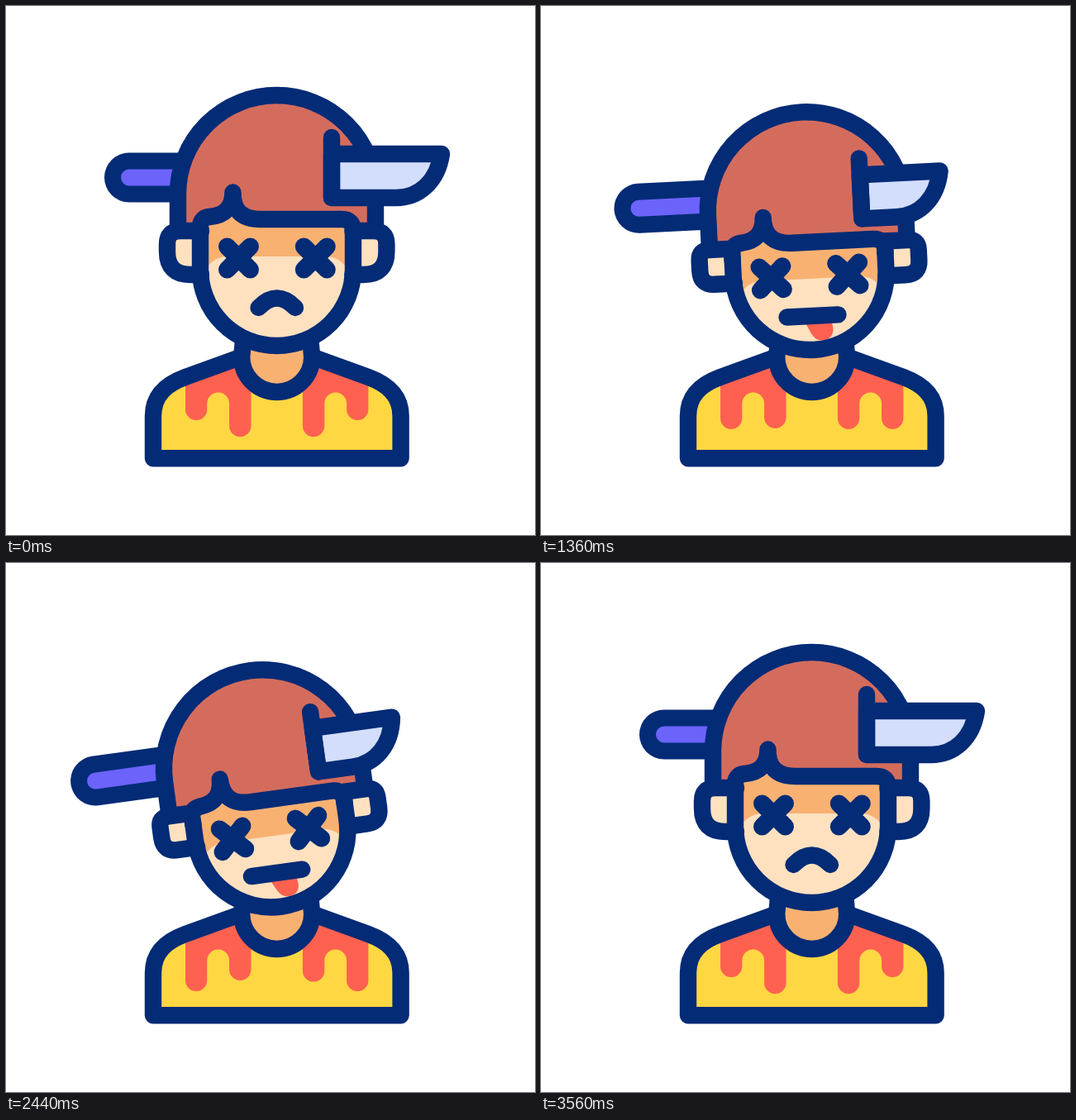
Write an HTML page with a canvas that moves like this. It is 640x640 px and loops after 3.6 s.

```html
<!DOCTYPE html>
<html lang="en">
<head>
<meta charset="utf-8">
<title>Knife through the head</title>
<style>
  html, body { margin: 0; width: 100%; height: 100%; overflow: hidden; background: #fff; }
  canvas { display: block; width: 640px; height: 640px; }
</style>
</head>
<body>
<canvas id="stage" width="640" height="640"></canvas>
<script>
const LOOP = 3600;
const NAVY = '#032b76', HAIR = '#d46c5d', SHADE = '#f9b172', SKIN = '#ffe1c0';
const RED = '#ff6150', YELLOW = '#ffd743', STEEL = '#d3defc', GRIP = '#6c63fa';
const LINE = 20.4;

const ctx = document.getElementById('stage').getContext('2d');
ctx.lineJoin = 'round';

// Each track is a list of [ms, value], eased between neighbours.
const TRACKS = {
  nod: [[390, 0], [920, 1], [2680, 1], [3210, 0]],
  face: [[280, 0], [920, 1], [2680, 1], [3320, 0]],
  mouth: [[220, 0], [440, 1], [3160, 1], [3380, 0]],
  drop: [[400, 0], [860, 1], [2740, 1], [3200, 0]],
  slide: [[400, 0], [860, 24], [1110, 0], [1360, 24], [1610, 0], [1860, 24],
          [2110, 0], [2360, 24], [2780, 24], [3260, -9], [3500, 0]],
  drip: [[310, 0], [920, 1], [1820, 0], [2680, 1], [3290, 0]]
};
const TILT_START = 746, TILT_TURN = 2640, TILT_END = 3060, TILT = -8.8;

const clamp = x => Math.min(1, Math.max(0, x));
const ease = x => x * x * (3 - 2 * x);
const mix = (a, b, k) => a + (b - a) * k;

function track(name, t) {
  const keys = TRACKS[name];
  let value = keys[0][1];
  for (let i = 1; i < keys.length; i++) {
    const [t0, a] = keys[i - 1], [t1, b] = keys[i];
    if (t >= t0) value = mix(a, b, ease(clamp((t - t0) / (t1 - t0))));
  }
  return value;
}

function tilt(t) {
  if (t < TILT_TURN) return TILT * clamp((t - TILT_START) / (TILT_TURN - TILT_START));
  return TILT * (1 - ease(clamp((t - TILT_TURN) / (TILT_END - TILT_TURN))));
}

function fill(d, color) {
  ctx.fillStyle = color;
  ctx.fill(new Path2D(d));
}

function stroke(d, color = NAVY, width = LINE, cap = 'round') {
  ctx.strokeStyle = color;
  ctx.lineWidth = width;
  ctx.lineCap = cap;
  ctx.stroke(new Path2D(d));
}

// Runs a drawing routine, then again mirrored left to right.
function mirrored(draw) {
  draw(false);
  ctx.save();
  ctx.translate(655.4, 0);
  ctx.scale(-1, 1);
  draw(true);
  ctx.restore();
}

// Draws turned around a point on the head's middle line.
function turned(degrees, y, draw) {
  ctx.save();
  ctx.translate(327.5, y);
  ctx.rotate(degrees * Math.PI / 180);
  ctx.translate(-327.5, -y);
  draw();
  ctx.restore();
}

function drawBody(drip) {
  const outline = 'M286 424 L217 449 C195 457 178 470 178 496 V547.2 H477.6 V496' +
    ' C477.6 470 460 457 438.4 449 L369.4 424';
  fill(outline, YELLOW);
  mirrored(flipped => {
    const outer = mix(488, 509, drip), inner = mix(508, flipped ? 490 : 488, drip);
    fill(`M217 449 L296.5 420 V${inner} a13.2 13.2 0 0 1 -26.4 0 V481` +
      ` a13.4 13.4 0 0 0 -26.8 0 V${outer} a13.15 13.15 0 0 1 -26.3 0Z`, RED);
  });
  stroke(outline);
  const neck = 'M287 405 L285.2 424.5 A42.5 42.5 0 0 0 370.2 424.5 L368.4 405';
  fill(neck, SHADE);
  stroke(neck, NAVY, LINE, 'butt');
}

function drawHandle(slide, drop) {
  const d = `M${149 - slide} ${207.5 + 27 * drop} H215`;
  stroke(d, NAVY, 60);
  stroke(d, GRIP, 20);
}

function drawEar(nod) {
  const top = 272 + 17 * nod, low = 325 + 6 * nod;
  const bend = mix(16, 12, nod), lobe = mix(28, 17, nod);
  const d = `M236 ${top} H${195 + bend} Q195 ${top} 195 ${top + bend}` +
    ` V${low - lobe} Q195 ${low} ${195 + lobe} ${low} H236`;
  fill(d, SKIN);
  stroke(d);
}

function jawLine(nod, top) {
  const y = 318.5 + 5 * nod;
  return `M235 ${top} V${y} A92.5 92.5 0 0 0 420 ${y} V${top}`;
}

function drawFace(nod, face) {
  const light = 303 + 27 * face;
  ctx.save();
  ctx.clip(new Path2D(jawLine(nod, 250)));
  fill('M230 240 H425 V430 H230Z', SHADE);
  fill(`M235 ${light + 30} Q245 ${light} 268 ${light} H387 Q410 ${light} 420 ${light + 30} V430 H235Z`, SKIN);
  ctx.restore();
}

function fringeLine(nod) {
  const p = (x, y) => `${x} ${y + 27.7 * nod}`;
  return `${p(235, 276)} L${p(235, 268)} Q${p(235, 256)} ${p(246, 255)}` +
    ` Q${p(274, 253)} ${p(274.5, 225.5)} Q${p(274, 258)} ${p(308, 258)}` +
    ` L${p(406, 258)} Q${p(420, 258)} ${p(420, 272)} L${p(420, 276)}`;
}

function drawHair(nod) {
  const cy = 227.5 + 20 * nod, end = 265 + 17 * nod;
  fill(`M208 ${end} L${fringeLine(nod)} L447 ${end} V${cy} A119.5 119.5 0 0 0 208 ${cy}Z`, HAIR);
  stroke(`M208 ${end} V${cy} A119.5 119.5 0 0 1 447 ${cy} V${end}`, NAVY, LINE, 'butt');
}

function drawBlade(slide, drop) {
  const s = 1.5 * slide;
  ctx.save();
  ctx.translate(0, 28.5 * drop);
  const d = `M394 179 H${527 - s} C${522 - s} 212 ${500 - s} 232 ${472 - s} 232 H394Z`;
  fill(d, STEEL);
  stroke(d);
  stroke('M394 159 V232');
  ctx.restore();
}

function drawFeatures(face, mouth) {
  ctx.save();
  ctx.translate(0, 22 * face);
  for (const x of [281.5, 374.3]) {
    stroke(`M${x - 14} 291 l28 28 m0 -28 l-28 28`, NAVY, 21);
  }
  ctx.translate(0, 353);
  ctx.save();
  ctx.scale(1, mouth);
  fill('M315 2 C326 13 325 30 340 30 C349 30 354 23 353 15 L351 2Z', RED);
  ctx.restore();
  const y = mix(12, 0, mouth);
  stroke(`M${mix(305.5, 298, mouth)} ${y} Q${mix(327.7, 329, mouth)} ${mix(-11, 0, mouth)}` +
    ` ${mix(350, 360, mouth)} ${y}`);
  ctx.restore();
}

function drawHead(t) {
  const nod = track('nod', t), face = track('face', t);
  const slide = track('slide', t), drop = track('drop', t);
  const angle = tilt(t);
  turned(angle, 372, () => {
    drawHandle(slide, drop);
    drawFace(nod, face);
    drawHair(nod);
    mirrored(() => drawEar(nod));
  });
  turned(angle, 385, () => drawFeatures(face, track('mouth', t)));
  turned(angle, 372, () => {
    stroke(jawLine(nod, 274 + 25 * nod));
    stroke('M' + fringeLine(nod));
    drawBlade(slide, drop);
  });
}

function render(now) {
  const t = now % LOOP;
  ctx.fillStyle = '#fff';
  ctx.fillRect(0, 0, 640, 640);
  drawBody(track('drip', t));
  drawHead(t);
}

const start = performance.now();
function tick() {
  render(performance.now() - start);
  requestAnimationFrame(tick);
}
tick();
</script>
</body>
</html>
```
